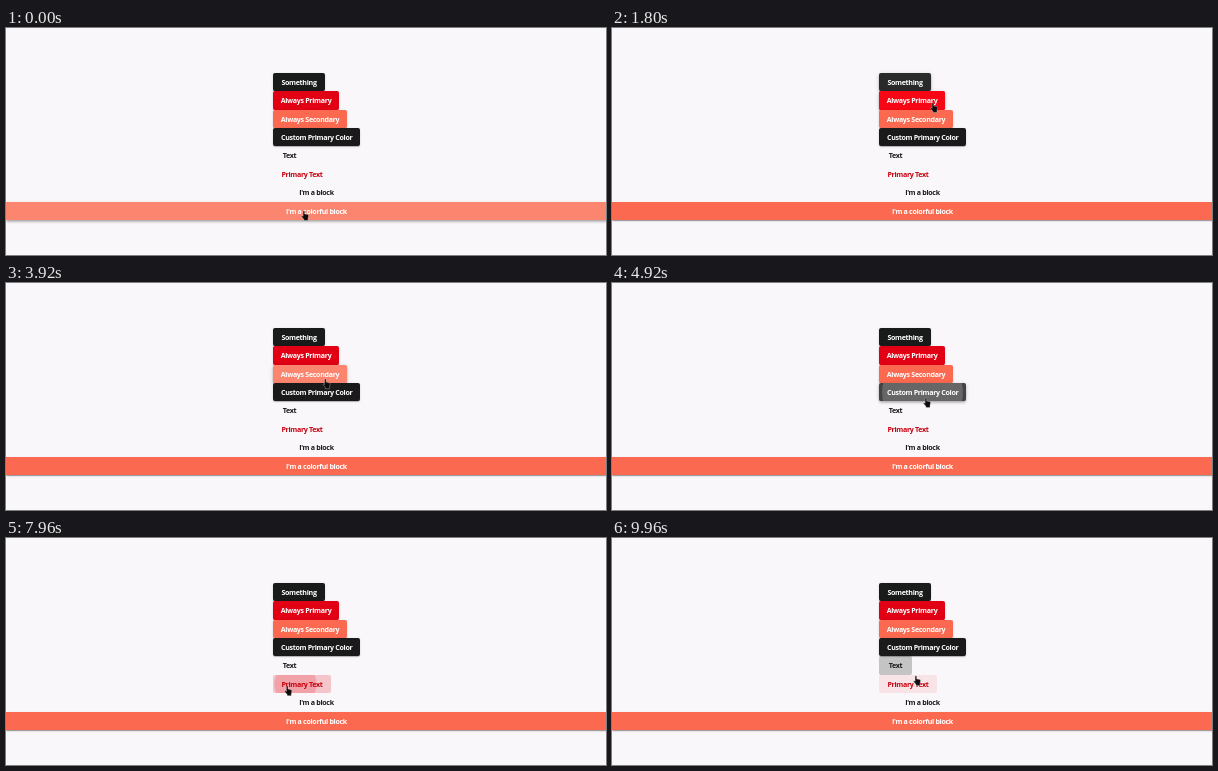
Recreate the animation shown at these times as an HTML page. Size 600 px wide and 227 px high, loop 10 s.

```html
<!DOCTYPE html>
<html lang="en">
<head>
<meta charset="utf-8">
<title>Buttons</title>
<style>
html, body { margin: 0; width: 100%; height: 100%; overflow: hidden; background: #f9f7f9; }
#stage { position: relative; width: 600px; height: 227px; overflow: hidden; }
.btn {
  position: absolute;
  font: 700 7.1px/18.4px "Open Sans", "Noto Sans", sans-serif; letter-spacing: -.32px;
}
.clip { position: absolute; inset: 0; overflow: hidden; border-radius: inherit; }
.lit { position: absolute; inset: 0; opacity: 0; }
.wave { position: absolute; border-radius: 50%; opacity: 0; }
.label { position: absolute; top: 0; transform: translateX(-50%); white-space: nowrap; }
#hand { position: absolute; left: .7px; top: .6px; width: 8px; height: 11px; overflow: visible; }
</style>
</head>
<body>
<div id="stage"></div>
<script>
const LOOP = 10000, TOP = 44.7, H = 18.42, LEFT = 267, FULL = 621;
const FADE = 100, HOLD = 1100, MOVE = 900;
const stage = document.getElementById('stage');

const filled = (text, w, bg, lit = .18, tint = '#fff') => ({ text, w, bg, fg: '#fff', tint, lit });
const plain = (text, w, fg, tint, lit = .2) => ({ text, w, fg, tint, lit });

const buttons = [
  filled('Something', 52, '#191b1a', .04),
  filled('Always Primary', 66, '#e10014', .75, '#ff0817'),
  filled('Always Secondary', 74, '#fb6a50'),
  filled('Custom Primary Color', 87.4, '#1a1a1a'),
  plain('Text', 33, '#1a1a1a', '#000'),
  plain('Primary Text', 58, '#c8000f', '#e10014'),
  plain("I'm a block", FULL, '#1a1a1a', '#000', .12),
  filled("I'm a colorful block", FULL, '#fb6a50')
];

// time, button index
const clicks = [[1250, 0], [1860, 1], [3320, 2], [4730, 3], [6880, 4], [7860, 5], [9380, 4]];

// arrival time, x, y of the hand; each move takes at most MOVE
const stops = [
  [0, 294, 181], [1020, 301, 55], [1650, 317, 73], [2700, 317, 89],
  [4550, 310, 113], [4970, 310, 113], [5420, 287, 127], [7050, 287, 127],
  [7800, 277, 146], [8480, 279, 147], [9200, 286, 126], [9750, 304, 132], [9950, 300, 136]
];

const clamp = v => Math.min(1, Math.max(0, v));
const smooth = v => v * v * (3 - 2 * v);
const mix = (a, b, k) => a + (b - a) * k;

function add(parent, cls, css) {
  const el = document.createElement('div');
  el.className = cls;
  Object.assign(el.style, css);
  return parent.appendChild(el);
}

buttons.forEach((b, i) => {
  const wide = b.w === FULL;
  b.x = wide ? 0 : LEFT;
  b.y = TOP + i * H;
  b.r = Math.hypot(b.w, H) / 2;
  b.el = add(stage, 'btn', {
    left: b.x + 'px', top: b.y + 'px', width: b.w + 'px', height: H + 'px',
    background: b.bg || 'none', color: b.fg, borderRadius: wide ? '0' : '2px'
  });
  const clip = add(b.el, 'clip', {});
  b.over = add(clip, 'lit', { background: b.tint });
  b.wave = add(clip, 'wave', {
    left: -b.r + 'px', top: -b.r + 'px', width: 2 * b.r + 'px', height: 2 * b.r + 'px', background: b.tint
  });
  add(b.el, 'label', { left: b.w / 2 + 'px' }).textContent = b.text;
});

stage.insertAdjacentHTML('beforeend',
  `<svg id="hand" viewBox="0 0 8 11"><path d="M2.1 1.2Q2.9 .2 3.7 1.2V3.9L6.8 4.6Q7.7 4.9 7.6 6L7 8.8V10.5H2.9V9.3L.5 6.6Q.5 5.6 1.3 5.7L2.1 6.4Z"
  fill="#0c0c0c" stroke="#fff" stroke-opacity=".55" stroke-width=".5"/></svg>`);
const hand = document.getElementById('hand');

function handAt(t) {
  const i = stops.findIndex(s => s[0] > t);
  if (i < 0) return stops[stops.length - 1].slice(1);
  const [t0, x0, y0] = stops[i - 1], [t1, x1, y1] = stops[i];
  const span = Math.min(MOVE, t1 - t0);
  const k = smooth(clamp((t - t1 + span) / span));
  return [mix(x0, x1, k), mix(y0, y1, k)];
}

// fingertip inside a button's own coordinates
function tip(b, t) {
  const [x, y] = handAt(t);
  return [x + 3 - b.x, y + 1 - b.y];
}

const lastClick = t => clicks.filter(c => c[0] <= t).pop() || [-LOOP, -1];

function active(b, t) {
  const [x, y] = tip(b, t), [at, i] = lastClick(t);
  return (x >= 0 && x < b.w && y >= 0 && y < H) || (buttons[i] === b && t - at < HOLD);
}

// averaging the recent past gives a linear fade
function glow(b, t) {
  const n = 10;
  let sum = 0;
  for (let i = 0; i < n; i++) sum += active(b, Math.max(0, t - i * FADE / n));
  return sum / n;
}

function ripple(b, t) {
  const [at, i] = lastClick(t), age = t - at;
  if (buttons[i] !== b || age > 600) { b.wave.style.opacity = 0; return; }
  const k = 1 - (1 - clamp(age / 300)) ** 2, [x, y] = tip(b, at);
  b.wave.style.transform =
    `translate(${mix(x, b.w / 2, k)}px, ${mix(y, H / 2, k)}px) scale(${mix(.3, 1, k)})`;
  b.wave.style.opacity = .19 * clamp(age / 100) * (1 - clamp((age - 300) / 300));
}

// three stacked layers that rise together
function shadow(g) {
  const layer = (y, blur, spread, a) => `0 ${y}px ${blur}px ${spread}px rgba(0,0,0,${a})`;
  return [
    layer(mix(1.5, 1, g), mix(.5, 2, g), mix(-1, -.5, g), .2),
    layer(mix(1, 2, g), mix(1, 2.5, g), 0, .14),
    layer(.5, mix(2.5, 5, g), 0, .12)
  ].join();
}

function draw(t) {
  for (const b of buttons) {
    const g = glow(b, t);
    b.over.style.opacity = g * b.lit;
    if (b.bg) b.el.style.boxShadow = shadow(g);
    ripple(b, t);
  }
  const [x, y] = handAt(t);
  hand.style.transform = `translate(${x}px, ${y}px)`;
}

const begin = performance.now();
function tick() {
  draw((performance.now() - begin) % LOOP);
  requestAnimationFrame(tick);
}
tick();
</script>
</body>
</html>
```
